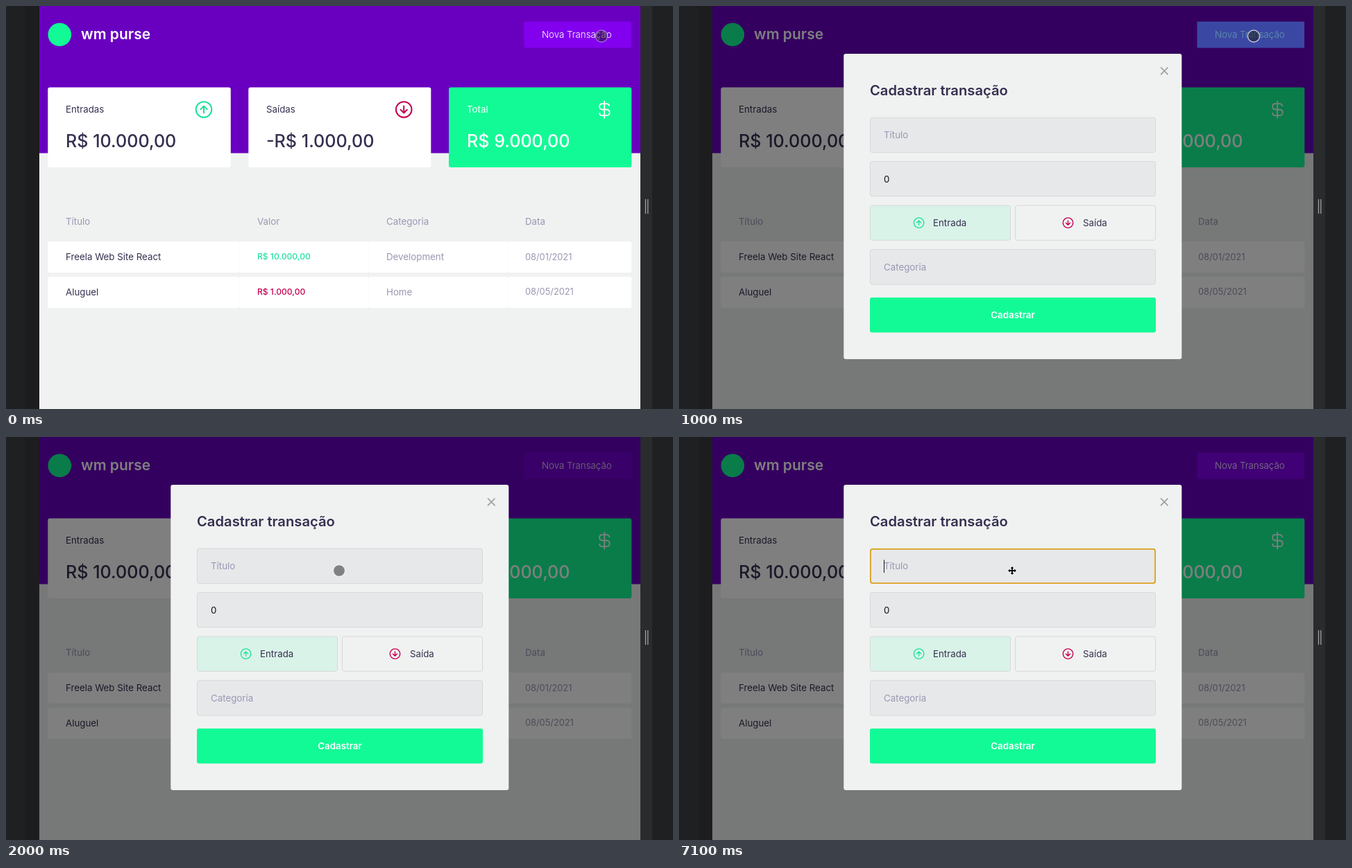
An HTML page for the animation above (8 s loop, 961 by 582 pixels).

```html
<!DOCTYPE html>
<html lang="pt-BR">
<head>
<meta charset="utf-8">
<title>Cadastrar transação</title>
<style>
html, body { margin: 0; width: 100%; height: 100%; overflow: hidden; background: #1f2022; }
svg { display: block; width: 961px; height: 582px; }
text { font: 400 13.3px Inter, "Open Sans", sans-serif; fill: #363050; }
text.brand { font-size: 21px; font-weight: 600; fill: #fff; }
text.light { font-weight: 300; fill: #fff; }
text.sum { font-size: 25.1px; font-weight: 500; }
text.muted { fill: #9997b3; }
text.date { font-size: 12.8px; fill: #9997b3; }
text.amount { font-size: 12.1px; font-weight: 500; }
text.heading { font-size: 20.2px; font-weight: 600; }
text.submit { font-weight: 600; fill: #fff; text-anchor: middle; }
text.white { fill: #fff; }
text.green { fill: #1fe29c; }
text.red { fill: #c4004f; }
.icon { fill: none; stroke-linecap: round; stroke-linejoin: round; }
.field { fill: #e7e8ea; stroke: #d6d8d9; }
</style>
</head>
<body>
<svg viewBox="0 0 961 582">
  <defs>
    <g id="arrow" class="icon">
      <circle r="11.3"/>
      <path d="M0 5V-5M-4.7-.3L0-5L4.7-.3"/>
    </g>
  </defs>

  <!-- browser frame -->
  <rect width="961" height="582" fill="#1f2022"/>
  <rect x="28" width="20" height="582" fill="#1d1d1f"/>
  <rect x="914" width="17" height="582" fill="#292b2d"/>
  <path d="M921.5 279V300M924.8 279V300" stroke="#a0a1a2" stroke-width="1.3"/>

  <!-- page -->
  <rect x="48" width="866" height="582" fill="#f0f2f1"/>
  <rect x="48" width="866" height="212.5" fill="#6900c0"/>
  <circle cx="77.3" cy="41.3" r="16.8" fill="#12fa96"/>
  <text class="brand" x="108" y="48">wm purse</text>
  <g id="open">
    <rect x="746.5" y="22.5" width="154.5" height="38" rx="3" fill="#8200ee"/>
    <text class="light" x="772" y="46">Nova Transação</text>
  </g>

  <g fill="#fff">
    <rect x="60.3" y="117.5" width="263.5" height="115.5" rx="3"/>
    <rect x="349.3" y="117.5" width="263" height="115.5" rx="3"/>
    <rect x="638" y="117.5" width="263.3" height="115.5" rx="3" fill="#12fa96"/>
  </g>
  <text x="86" y="154">Entradas</text>
  <text x="375" y="154">Saídas</text>
  <text class="white" x="664" y="154">Total</text>
  <text class="sum" x="86" y="204.3">R$ 10.000,00</text>
  <text class="sum" x="375" y="204.3">-R$ 1.000,00</text>
  <text class="sum white" x="664" y="204.3">R$ 9.000,00</text>
  <use href="#arrow" transform="translate(285 149.5)" stroke="#1fe29c" stroke-width="2"/>
  <use href="#arrow" transform="translate(573.2 149.5) rotate(180)" stroke="#c4004f" stroke-width="2"/>
  <path class="icon" transform="translate(862.2 149.7)" stroke="#fff" stroke-width="1.8"
    d="M0-12V12M7-5.5C6.5-8 5-8.5 3-8.5H-3C-8.5-8.5-8.5-.5-3-.2H3C9 0 9 8.5 3 8.5H-3C-5.5 8.5-7 7.5-7 5"/>

  <text class="muted" x="86" y="316.3">Título</text>
  <text class="muted" x="362" y="316.3">Valor</text>
  <text class="muted" x="548" y="316.3">Categoria</text>
  <text class="muted" x="748" y="316.3">Data</text>
  <g id="rows" fill="#fff"></g>
  <text x="86" y="366.8">Freela Web Site React</text>
  <text class="amount green" x="362" y="366.3">R$ 10.000,00</text>
  <text class="muted" x="548" y="366.8">Development</text>
  <text class="date" x="748" y="366.6">08/01/2021</text>
  <text x="86" y="417.6">Aluguel</text>
  <text class="amount red" x="362" y="417.1">R$ 1.000,00</text>
  <text class="muted" x="548" y="417.6">Home</text>
  <text class="date" x="748" y="417.4">08/05/2021</text>

  <!-- dialog -->
  <g id="dialog">
    <rect x="48" width="866" height="582" fill="#000" fill-opacity=".5"/>
    <rect x="237.3" y="69" width="487" height="441" rx="3" fill="#f0f2f1"/>
    <path class="icon" d="M694.5 89L704 98.6M704 89L694.5 98.6" stroke="#9c9ca3" stroke-width="1.7"/>
    <text class="heading" x="275" y="128.6">Cadastrar transação</text>
    <g class="field">
      <rect x="275.5" y="161.2" width="411" height="50.3" rx="3"/>
      <rect x="275.5" y="224.5" width="411" height="50.3" rx="3"/>
      <rect x="275.5" y="288" width="202" height="50.3" rx="3" fill="#d9f3e8"/>
      <rect x="484.5" y="288" width="202" height="50.3" rx="3" fill="#f0f2f1"/>
      <rect x="275.5" y="351.7" width="411" height="50.3" rx="3"/>
    </g>
    <rect x="275" y="421" width="412" height="50.5" rx="3" fill="#12fa96"/>
    <text class="muted" x="295" y="191">Título</text>
    <text x="295" y="254.5" style="fill:#111">0</text>
    <text x="366" y="318">Entrada</text>
    <text x="582" y="318">Saída</text>
    <text class="muted" x="295" y="381.5">Categoria</text>
    <text class="submit" x="481" y="451">Cadastrar</text>
    <use href="#arrow" transform="translate(345.6 313.1) scale(.64)" stroke="#1fe29c" stroke-width="2.2"/>
    <use href="#arrow" transform="translate(560.5 313.1) rotate(180) scale(.64)" stroke="#c4004f" stroke-width="2.2"/>
    <g id="focus">
      <rect x="276" y="161.9" width="410" height="49.2" rx="3" fill="none" stroke="#dba31c" stroke-width="1.8"/>
      <path d="M295.5 177.5V196" stroke="#111"/>
    </g>
  </div></g>

  <g fill="#33b5e5" fill-opacity=".4">
    <rect id="tapOpen" x="746.5" y="22.5" width="154.5" height="38"/>
    <rect id="tapField" x="275" y="161" width="412" height="51"/>
  </g>

  <g id="pointer">
    <circle id="touch" r="8.6" fill="#191919" fill-opacity=".5" stroke="#fff" stroke-width="1.5"/>
    <path id="move" fill="#000" stroke="#fff" stroke-width="1.4" paint-order="stroke" stroke-linejoin="round"
      d="M0-6L2.5-3.2H.9V-.9H3.2V-2.5L6 0L3.2 2.5V.9H.9V3.2H2.5L0 6L-2.5 3.2H-.9V.9H-3.2V2.5L-6 0L-3.2-2.5V-.9H-.9V-3.2H-2.5Z"/>
  </g>
</svg>
<script>
const LOOP = 8000;
const el = id => document.getElementById(id);
const show = (id, on) => el(id).style.display = on ? '' : 'none';
const ramp = (t, from, length) => Math.min(1, Math.max(0, (t - from) / length));

const columns = [60.3, 336.3, 522.3, 722.5, 901.3];
el('rows').innerHTML = [340, 391].map(y => columns.slice(1).map((end, i) =>
  `<rect x="${columns[i]}" y="${y}" width="${end - columns[i]}" height="45" rx="3"/>`).join('')).join('');

// Pointer stops: time, x, y
const stops = [
  [0, 858, 43.5], [500, 828, 43.5], [1500, 787.5, 47.5], [1600, 640, 100],
  [1700, 504, 160.5], [1900, 484, 186], [2000, 480, 193]
];

function draw(t) {
  const [, x, y] = stops.filter(s => s[0] <= t).pop();
  el('pointer').setAttribute('transform', `translate(${x} ${y})`);
  el('touch').setAttribute('stroke-opacity', t < 1000 ? .4 : .7);
  show('touch', t < 7100);
  show('move', t >= 7100);
  show('dialog', t >= 1000);
  show('focus', t >= 2500);
  show('tapOpen', t >= 1000 && t < 1200);
  show('tapField', t >= 2500 && t < 2900);
  // The open button darkens while hovered
  const hover = ramp(t, 1000, 200) - ramp(t, 2500, 200);
  el('open').style.filter = `brightness(${1 - .1 * hover})`;
}

const start = performance.now();
function tick() {
  draw((performance.now() - start) % LOOP);
  requestAnimationFrame(tick);
}
tick();
</script>
</body>
</html>
```
